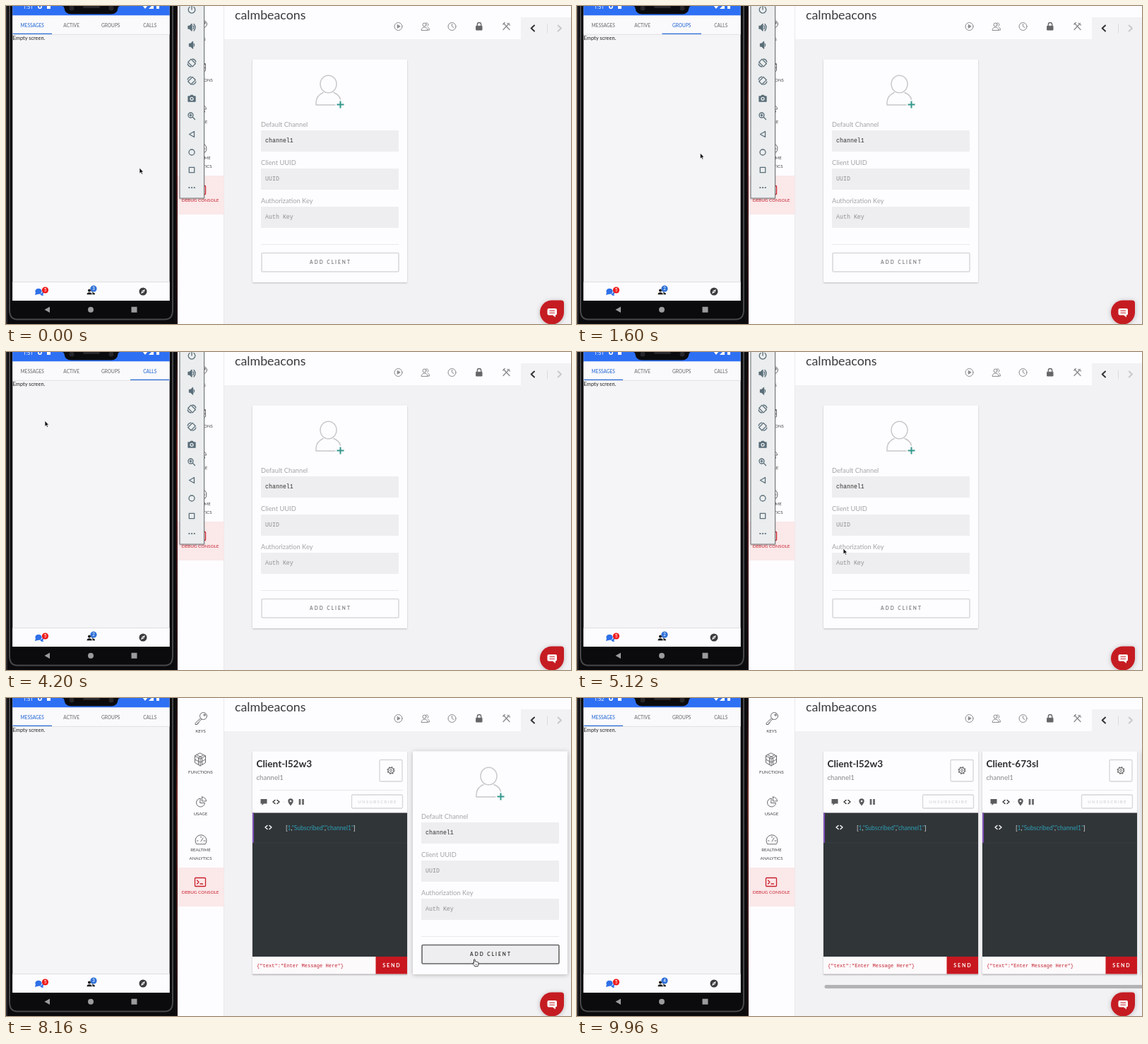
Animation of 800 by 450 pixels, one loop 10000 ms. Source, as an HTML page:

```html
<!DOCTYPE html>
<html lang="en">
<head>
<meta charset="utf-8">
<title>Presence console</title>
<style>
html,body{margin:0;width:100%;height:100%;overflow:hidden;background:#f2f1f3}
svg{display:block;width:100vw;height:100vh}
text{font-family:Lato,sans-serif;white-space:pre}
.mono{font-family:"Liberation Mono",monospace;font-size:8.3px}
.rob{font-family:Roboto,sans-serif}
.mid{text-anchor:middle}
.ln{fill:none;stroke-linecap:round;stroke-linejoin:round}
</style>
</head>
<body>
<svg id="stage" viewBox="0 0 800 450" xmlns="http://www.w3.org/2000/svg">
<defs>
  <filter id="soft" x="-20%" y="-20%" width="140%" height="140%"><feDropShadow dx="0" dy="1" stdDeviation=".8" flood-color="#000" flood-opacity=".22"/></filter>
  <filter id="lift" x="-20%" y="-20%" width="140%" height="140%"><feDropShadow dx="0" dy="1" stdDeviation="3" flood-color="#000" flood-opacity=".25"/></filter>
  <clipPath id="screen"><rect x="9.300" y="0" width="222.300" height="417"/></clipPath>
  <linearGradient id="edge" x1="0" x2="0" y1="0" y2="1"><stop offset="0" stop-color="#1c1214"/><stop offset=".3" stop-color="#6a2a26"/><stop offset=".6" stop-color="#4a1c1e"/><stop offset="1" stop-color="#1c1216"/></linearGradient>
</defs>

<!-- web page -->
<rect width="800" height="450" fill="#f2f1f3"/>
<path d="M309 0H800V16H729V47H309Z" fill="#fdfcfe"/>
<text x="324" y="18.500" font-size="17.800" fill="#3a3a3c">calmbeacons</text>
<g class="ln" stroke="#8a8a8c" stroke-width="1">
  <circle cx="555.500" cy="29" r="5.500"/><path d="M554.200 26.800V31.200L557.800 29Z" fill="#8a8a8c"/>
  <circle cx="592.500" cy="26.500" r="2.500"/><path d="M588 34C588 28.700 597 28.700 597 34ZM594.500 24.200a2.200 2.200 0 0 1 2.200 4.200M597.500 29.800Q599.500 31 599.500 34H597"/>
  <circle cx="631.500" cy="29" r="5.500"/><path d="M631.500 25.500V29L634 30.500"/>
  <path d="M667.300 28V26.200a2.700 2.700 0 0 1 5.400 0V28" stroke="#666668" stroke-width="1.300"/>
  <rect x="666" y="28.300" width="8" height="5.700" fill="#666668" stroke="#666668"/>
  <path d="M704.500 24.500L713 33.500M706.300 23.500l-2.500 2.500M712.500 24.500L704 33.500M710 24.500l3.500 2.500" stroke-width="1.300"/>
</g>
<g class="ln" stroke-width="2">
  <path d="M748 27.500L743.700 31.500L748 35.500" stroke="#333"/>
  <path d="M781.700 27.500L786 31.500L781.700 35.500" stroke="#c9c8ca"/>
  <path d="M766.500 26V38" stroke="#dcdbdd" stroke-width="1"/>
</g>
<g id="cards"></g>
<rect id="bar" x="350.500" y="406" width="460" height="5" rx="2.500" fill="#b3b2b4"/>

<!-- side menu -->
<rect x="243" width="66" height="450" fill="#fdfcfe"/>
<path d="M308.500 0V450" stroke="#eae9eb"/>
<rect x="243" y="240" width="65.500" height="55" fill="#fbe8e9"/>
<g class="ln" stroke="#6a6a6c" stroke-width="1">
  <circle cx="279.500" cy="25.500" r="5"/><circle cx="281" cy="24" r="1.200"/><path d="M275.700 28.500L268 35.500V37.500H271V35.500H273V33.500L277 30"/>
  <path d="M275 78L282.500 82V91.500L275 96L267.500 91.500V82ZM267.500 82L275 86L282.500 82M275 86V96M270 80.500L277.500 84.500V94M280 80.500L272.500 84.500V94M267.500 87L275 91L282.500 87"/>
  <path d="M275 142a6 6 0 1 0 6.500 6.500H275ZM277.500 140V146H283.500A6 6 0 0 0 277.500 140Z"/>
  <path d="M269.500 206.500a8 8 0 1 1 13 0ZM276 203L279 198M270.500 202H272M280 202H282M276 196V197.500"/>
  <g stroke="#c8202c" stroke-width="1.300"><rect x="267.500" y="254.500" width="15" height="12" rx="1"/><path d="M270.500 258L273 260.500L270.500 263M275 263H278.500"/></g>
</g>
<g id="menu" class="mid" font-size="6.1" fill="#444"></g>

<!-- emulator tools -->
<g id="tools">
  <rect x="246" y="-4" width="34.500" height="276" fill="#ebedee" stroke="#727577" filter="url(#soft)"/>
  <g class="ln" stroke="#5a6e79" stroke-width="1.300">
    <path d="M260 1.500a4.800 4.800 0 1 0 6 0M263 -1V5"/>
    <path d="M258 28.500H260L263 25.500V35L260 32H258Z" fill="#5a6e79"/>
    <path d="M265 28Q266.500 30 265 32.500M266 25.500Q270 30.200 266 35"/>
    <path d="M259.500 53.500H261.500L264.500 50.500V60L261.500 57H259.500ZM266 53.500Q267.300 55 266 57" fill="#5a6e79"/>
    <g id="turn"><rect x="258.500" y="77.500" width="9" height="6" transform="rotate(45 263 80.500)"/><path d="M264 75Q268 75.500 268.800 79M262 86Q258 85.500 257.200 82"/></g>
    <use href="#turn" transform="translate(526 25.200) scale(-1 1)"/>
    <path d="M258 128H260.500L261.500 126.500H264.500L265.500 128H268V135H258Z" fill="#5a6e79"/><circle cx="263" cy="131.300" r="2" stroke="#ebedee" fill="#5a6e79"/>
    <circle cx="261.500" cy="154.500" r="3.500"/><path d="M264.300 157.300L267.500 160.500M260 154.500H263M261.500 153V156"/>
    <path d="M266.500 177.500V185.500L259.500 181.500Z"/><circle cx="263" cy="207" r="4"/><rect x="259.300" y="228.300" width="7.400" height="7.400"/>
    <path d="M259.300 257H259.400M263 257H263.100M266.700 257H266.800" stroke-width="2.200"/>
  </g>
</g>

<!-- phone -->
<rect width="243" height="450" fill="#0b0b0d"/>
<rect x="241" width="2" height="450" fill="url(#edge)"/>
<path d="M5 0V430Q5 443.500 16 443.500H225Q236 443.500 236 430V0" fill="none" stroke="#48484b" stroke-width="2"/>
<path d="M1 0V450" stroke="#2c2c2f" stroke-width="2"/>
<g clip-path="url(#screen)">
  <rect x="9" width="223" height="417" fill="#f5f4f7"/>
  <g id="pages" class="rob" font-size="7.45" fill="#222"></g>
  <rect x="9" width="223" height="13.500" fill="#2e70f4"/>
  <rect x="9" y="13.500" width="223" height="26.500" fill="#faf9fb"/>
  <path d="M9 40.300H232" stroke="#dedde0" stroke-width=".8"/>
  <g id="tabs" class="rob mid" font-size="6.55" font-weight="500"></g>
  <rect id="mark" y="38.700" width="55.500" height="1.300" fill="#2e70d8"/>
  <g fill="#fff"><text id="clock" class="rob" x="24" y="4" font-size="7.5"></text>
    <circle cx="48" cy="1" r="2.200" fill="none" stroke="#fff" stroke-width="1.500"/><rect x="58" y="-2" width="5" height="6"/>
    <path d="M193 -1H201L197 4ZM209 -3V4H202Z"/><rect x="213" y="-2" width="4" height="6"/></g>
  <rect x="9" y="390.500" width="223" height="27" fill="#fcfbfd"/>
  <path d="M9 390.500H232" stroke="#d9d8db" stroke-width=".8"/>
  <g fill="#2e70e8"><ellipse cx="46" cy="403.700" rx="4.600" ry="4"/><path d="M42 405L41 409L46 407.500ZM48 407.500Q52.500 406.500 51.500 403Q54.500 405.500 52.200 407.800L53 410Q49.500 410 48 407.500Z"/></g>
  <circle cx="55.500" cy="402" r="4.600" fill="#f01818"/><text class="rob mid" x="55.500" y="404.400" font-size="6.500" fill="#fff">5</text>
  <g fill="#161616"><circle cx="118" cy="402.500" r="2"/><circle cx="122.300" cy="402.500" r="1.900"/><path d="M114.500 408.300Q114.500 405.300 118 405.300T121.700 408.300ZM122.500 408.300Q123 406.500 121.500 405.300Q126 405 126 408.300Z"/></g>
  <circle cx="124" cy="400" r="4.600" fill="#2e70d8"/><text id="count" class="rob mid" x="124" y="402.400" font-size="6.500" fill="#fff"></text>
  <circle cx="194" cy="404" r="5.500" fill="#3c3c3e"/><path d="M197 401L195.200 405.200L191 407L192.800 402.800Z" fill="#fff"/><circle cx="194" cy="404" r=".8" fill="#3c3c3e"/>
</g>
<path d="M79 0Q82 0 82.500 3Q83.500 11.500 92 11.500H149Q157.500 11.500 158.500 3Q159 0 162 0Z" fill="#0b0b0d"/>
<g fill="#26262b"><circle cx="93" cy="3" r="3.500"/><circle cx="149" cy="3" r="3.500"/><rect x="109" y="0" width="24" height="3" rx="1.500"/></g>
<path d="M62 425.500V434L54.500 429.700Z" fill="#9b9b9d"/><circle cx="120" cy="429.700" r="4" fill="#9b9b9d"/><rect x="177.500" y="425.700" width="8" height="8" fill="#9b9b9d"/>

<!-- chat button -->
<path d="M773 416.500H786Q790 416.500 790 420.500V433.500a17 17 0 1 1 -17 -17Z" fill="#c51a22" filter="url(#lift)"/>
<path d="M768.500 428H778Q780 428 780 430V435.500Q780 437.500 778 437.500V440.500L774 437.500H768.500Q766.500 437.500 766.500 435.500V430Q766.500 428 768.500 428Z" fill="#fff"/>
<path d="M769.500 431.300H777M769.500 434.200H777" stroke="#c51a22" stroke-width="1.100"/>

<g id="arrow"><path d="M0 0V8.200L1.900 6.500L3.200 9.300L4.600 8.600L3.300 6H5.700Z" fill="#111" stroke="#fff" stroke-width=".7"/></g>
<g id="hand"><path d="M2.500 5V1.200Q3.400 -.2 4.200 1.200V4Q5.300 3.300 5.800 4.300Q7 3.700 7.400 4.700Q9 4.500 9 6V8Q8.500 9.500 8 10.800H3.800Q2.500 8.500 .6 6.700Q.5 5 2.500 6.500Z" fill="#fff" stroke="#222" stroke-width=".9" stroke-linejoin="round"/><path d="M4.800 7V9M6.500 7V9" stroke="#222" stroke-width=".5"/></g>
</svg>
<script>
const $ = id => document.getElementById(id);
const LOOP = 10000, HOME = 349;
const TAB_NAMES = ['MESSAGES', 'ACTIVE', 'GROUPS', 'CALLS'], TAB_W = 55.5, PAGE_W = 222;

const label = (x, y, s, more = '') => `<text x="${x}" y="${y}" ${more}>${s}</text>`;

// Cards are drawn at local x = 0 and moved as a whole.
const field = (y, name, value, color) =>
  label(12, y - 4.8, name, 'font-size="9.3" fill="#a5a4a6"') +
  `<rect x="12" y="${y}" width="195" height="30" fill="#eeedef"/>` +
  label(18, y + 17.3, value, `class="mono" fill="${color}"`);

const addCard = () => `<g id="add">
  <rect id="addBox" y="75.500" width="219" height="315.500" rx="1" fill="#fdfcfe"/>
  <g class="ln" stroke="#c8c7c9" stroke-width="1.500"><ellipse cx="107.500" cy="110.500" rx="11.500" ry="12.300"/>
  <path d="M117 140H90V136Q90.500 127 100 122.500M115 122.500Q122.500 125.500 124.500 132"/></g>
  <path d="M119.500 139.500H129.500M124.500 134.500V144.500" stroke="#35988c" stroke-width="2"/>
  ${field(176, 'Default Channel', 'channel1', '#333')}
  ${field(230, 'Client UUID', 'UUID', '#929193')}
  ${field(284, 'Authorization Key', 'Auth Key', '#929193')}
  <path d="M12 337.500H207" stroke="#e9e8ea"/>
  <rect id="btn" x="13" y="349.500" width="194" height="26.500" rx="1.500" stroke-width="1.600"/>
  ${label(110.5, 365, 'ADD CLIENT', 'id="btnText" class="mid" font-size="6.6" font-weight="700" letter-spacing="2"')}
</g>`;

const clientCard = (id, name) => `<g id="${id}">
  <rect y="75.500" width="219" height="315.500" fill="#fdfcfe" filter="url(#soft)"/>
  ${label(5.5, 97.8, name, 'font-size="13.6" font-weight="700" fill="#2c2c2e"')}
  ${label(5.5, 116, 'channel1', 'font-size="9.6" fill="#88878a"')}
  <rect x="180" y="87.500" width="32" height="30.500" rx="1.500" fill="none" stroke="#d6d5d8" stroke-width="1.300"/>
  <circle cx="196" cy="102.500" r="3.900" fill="none" stroke="#666" stroke-width="1.200"/>
  <circle cx="196" cy="102.500" r="4.900" fill="none" stroke="#666" stroke-width="1.200" stroke-dasharray="1.900 1.950"/>
  <circle cx="196" cy="102.500" r="1.500" fill="none" stroke="#666"/>
  <path d="M10 130.500H213" stroke="#e8e7e9"/>
  <path d="M11.500 143H20.500V149.500H16L13.500 152V149.500H11.500Z" fill="#5b5b5d"/>
  <path class="ln" d="M32 144.500L29 147L32 149.500M35 144.500L38 147L35 149.500" stroke="#333" stroke-width="1.400"/>
  <circle cx="44.500" cy="147" r=".8" fill="#dcdbdd"/>
  <path d="M54 152.500Q50.300 148 50.300 146a3.700 3.700 0 0 1 7.400 0Q57.700 148 54 152.500Z" fill="#5b5b5d"/><circle cx="54" cy="146" r="1.300" fill="#fdfcfe"/>
  <path d="M67 143V151M71.500 143V151" stroke="#666" stroke-width="2.700"/>
  <rect x="140.500" y="137" width="72" height="19" rx="1.500" fill="none" stroke="#d6d5d8" stroke-width="1.300"/>
  ${label(177, 148.8, 'UNSUBSCRIBE', 'class="mid" font-size="6.1" font-weight="700" letter-spacing="1.25" fill="#d9d8db"')}
  <rect y="162.500" width="219" height="203.500" fill="#303538"/>
  <g class="note"><rect y="162.500" width="2" height="42.500" fill="#7c50b8"/>
    <path d="M2 205H219" stroke="#3a4043" stroke-width=".8"/>
    <path class="ln" d="M21 180.500L18 183L21 185.500M24 180.500L27 183L24 185.500" stroke="#fff" stroke-width="1.400"/>
    <text x="47" y="186.800" font-size="8.500" fill="#2e9fb5"><tspan fill="#eee">[</tspan>1<tspan fill="#eee">,</tspan>"Subscribed"<tspan fill="#eee">,</tspan>"channel1"<tspan fill="#eee">]</tspan></text></g>
  <rect y="366" width="175" height="24.500" fill="#fdfafc"/><path d="M0 391H219" stroke="#b9b8ba"/>
  ${label(6, 381, '{"text":"Enter Message Here"}', 'class="mono" style="font-size:7.07px" fill="#c22430"')}
  <rect x="174.500" y="366" width="44.500" height="24.500" fill="#c8171f"/>
  ${label(197.5, 381, 'SEND', 'class="mid" font-size="7.2" font-weight="700" letter-spacing="1.8" fill="#fff"')}
</g>`;

$('cards').innerHTML = clientCard('c1', 'Client-l52w3') + clientCard('c2', 'Client-673sl') + addCard();
$('c1').setAttribute('transform', `translate(${HOME} 0)`);
$('c2').setAttribute('transform', 'translate(574 0)');
$('tabs').innerHTML = TAB_NAMES.map((s, i) => label(37.2 + i * TAB_W, 29.6, s)).join('');
$('pages').innerHTML = TAB_NAMES.map((s, i) => label(9.6 + i * PAGE_W, 48, 'Empty screen.')).join('');
$('menu').innerHTML = [['KEYS', 49.3], ['FUNCTIONS', 107], ['USAGE', 166.4], ['REALTIME', 216.6], ['ANALYTICS', 228.6]]
  .map(([s, y]) => label(275.5, y, s)).join('') + label(275, 277.3, 'DEBUG CONSOLE', 'font-size="6.3" fill="#c8202c"');

// [time, x, y] with eased travel between the points
const MOUSE = [
  [0, 189, 229], [200, 187, 226], [480, 84, 222], [800, 186, 214], [920, 186, 212], [1180, 78, 206],
  [1560, 174, 208], [1700, 176, 208], [1980, 72, 212], [2100, 72, 214], [2650, 118, 402], [3400, 118, 402],
  [4100, 55, 98], [4250, 55, 97], [4560, 39, 29], [4720, 39, 29], [5320, 494, 364], [6150, 494, 364],
  [7120, 660, 369], [8750, 660, 369], [9500, 720, 456], [10000, 720, 456]];
// [time, tab position]
const SWIPE = [[0, 0], [220, 0], [620, 1], [940, 1], [1340, 2], [1720, 2], [2120, 3], [4640, 3], [4900, 0], [10000, 0]];

const ease = u => u * u * (3 - 2 * u);
function along(keys, t) {
  const i = Math.max(1, keys.findIndex(k => k[0] > t));
  const a = keys[i - 1], b = keys[i], u = ease((t - a[0]) / (b[0] - a[0]));
  return a.slice(1).map((v, j) => v + (b[j + 1] - v) * u);
}
const step = (t, first, ...changes) => changes.reduce((v, [at, next]) => t >= at ? next : v, first);
const show = (el, on) => el.setAttribute('visibility', on ? 'visible' : 'hidden');
const move = (el, x, y = 0) => el.setAttribute('transform', `translate(${x} ${y})`);

function draw(t) {
  const [mx, my] = along(MOUSE, t), [pos] = along(SWIPE, t);
  move($('pages'), -pos * PAGE_W);
  $('mark').setAttribute('x', 9.5 + pos * TAB_W);
  [...$('tabs').children].forEach((el, i) =>
    el.setAttribute('fill', i === Math.round(pos) ? '#2e70d8' : '#737275'));
  $('count').textContent = step(t, 3, [840, 2], [7520, 3], [9640, 4]);
  $('clock').textContent = step(t, '1:51', [9000, '1:52']);

  show($('tools'), t < 5400);
  const x = step(t, HOME, [5640, 576], [8640, 801]);
  move($('add'), x);
  $('addBox').setAttribute('filter', x === HOME ? 'url(#soft)' : 'url(#lift)');
  const hover = mx > x + 12 && mx < x + 207 && my > 348 && my < 377, used = t >= 5400;
  $('btn').setAttribute('fill', used ? '#eeedef' : '#fdfcfe');
  $('btn').setAttribute('stroke', hover ? '#666668' : '#d9d8db');
  $('btnText').setAttribute('fill', hover ? '#333' : used ? '#58575a' : '#828184');

  const card = (id, at, noteAt) => {
    $(id).style.display = t >= at ? '' : 'none';
    $(id).querySelector('.note').style.display = t >= noteAt ? '' : 'none';
  };
  card('c1', 5640, 6700);
  card('c2', 8640, 9300);
  show($('bar'), t >= 8640);

  const hand = t >= 5220;
  show($('arrow'), !hand);
  show($('hand'), hand);
  move($(hand ? 'hand' : 'arrow'), mx, my);
}

function tick() {
  draw(performance.now() % LOOP);
  requestAnimationFrame(tick);
}
tick();
</script>
</body>
</html>
```
